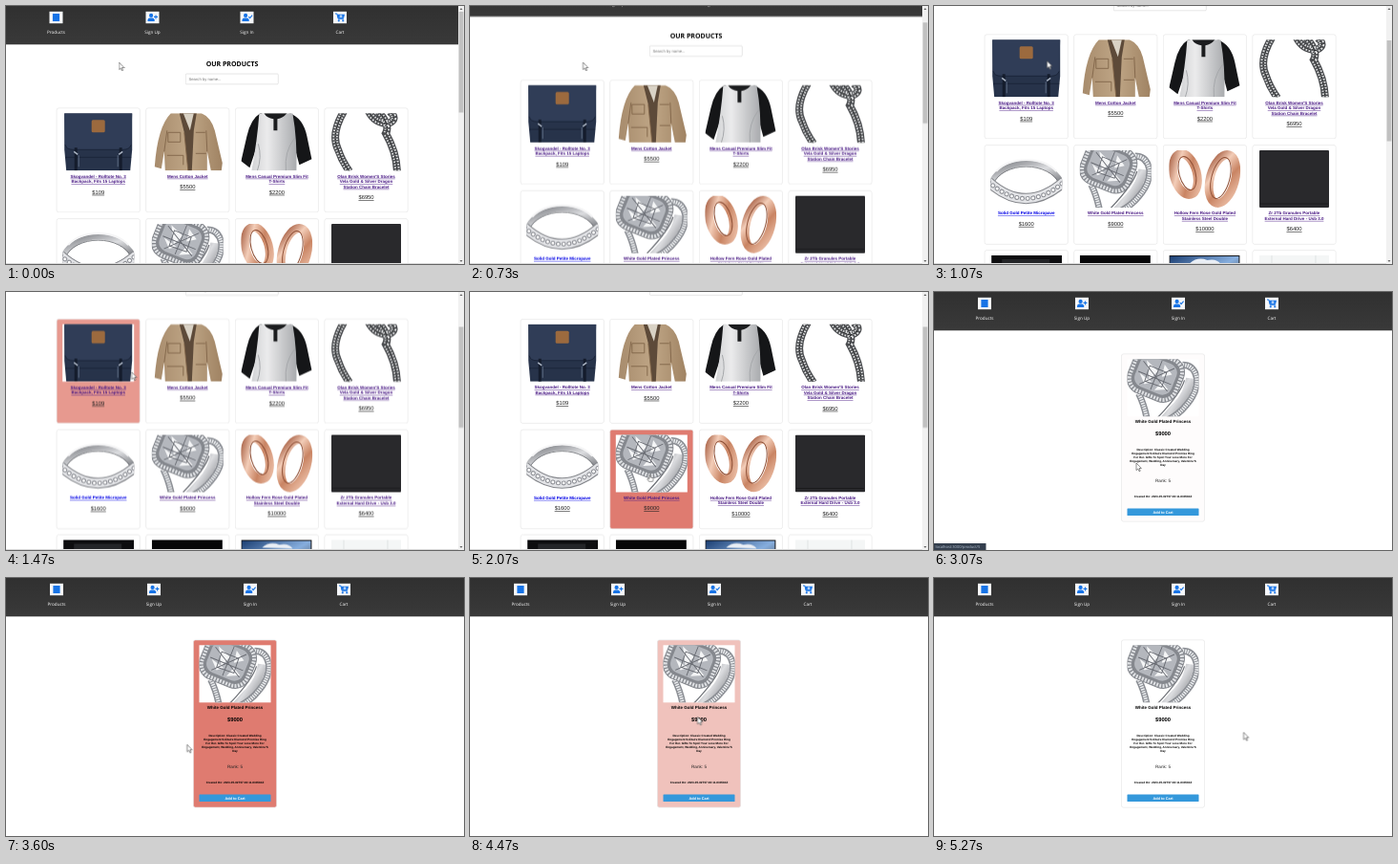
These frames come from a looping animation (480 px wide and 270 px high, 5.74 s). An HTML page:

```html
<!DOCTYPE html>
<html lang="en">
<head>
<meta charset="utf-8">
<title>Product shop</title>
<style>
  html, body { margin: 0; width: 100%; height: 100%; overflow: hidden; background: #fff; }
  svg { display: block; text-rendering: geometricPrecision; }
  text { font-family: "Liberation Sans", Arial, sans-serif; text-anchor: middle; }
  .ui { font-family: "Open Sans", "Noto Sans", sans-serif; }
  .start { text-anchor: start; }
  .name { font-size: 4.5px; font-weight: bold; }
  .price { font-size: 5.8px; }
  .link { text-decoration: underline; text-decoration-thickness: .4px; fill: #4a1a85; }
  .link.new { fill: #0000e6; }
  .link.price { fill: #222; }
  .fine { font-size: 3.05px; font-weight: bold; }
  .card { fill: #fff; stroke: #ebebeb; stroke-width: .5; filter: drop-shadow(0 .4px .6px #0002); }

  .scroll, .thumb, .shop, .item, .detail, .status, .cursor, .arrow, .hand, .hot {
    animation: 5740ms linear infinite;
  }
  .scroll { animation-name: scroll; }
  .thumb { animation-name: thumb; }
  .shop { animation-name: shop; }
  .item { animation-name: item; }
  .detail { animation-name: detail; }
  .status { animation-name: status; }
  .cursor { animation-name: move; }
  .arrow { animation-name: arrow; }
  .hand { animation-name: hand; }
  .hot0 { animation-name: hot0; }
  .hot1 { animation-name: hot1; }
  .hot5 { animation-name: hot5; }
  .hotItem { animation-name: hotItem; }

  @keyframes scroll {
    0%, 12.69% { transform: translateY(0); }
    12.7% { transform: translateY(-28.5px); animation-timing-function: cubic-bezier(.2, .6, .5, 1); }
    18.6% { transform: translateY(-77px); }
    22.1%, 100% { transform: translateY(-78.5px); }
  }
  @keyframes thumb {
    0%, 12.69% { transform: translateY(0); }
    12.7% { transform: translateY(11px); animation-timing-function: cubic-bezier(.2, .6, .5, 1); }
    18.6% { transform: translateY(30px); }
    22.1%, 100% { transform: translateY(30.5px); }
  }
  @keyframes shop { 0%, 49.97% { visibility: visible; } 49.98%, 100% { visibility: hidden; } }
  @keyframes item { 0%, 49.97% { visibility: hidden; } 49.98%, 100% { visibility: visible; } }
  @keyframes detail { 0%, 51% { opacity: 0; } 51.02%, 100% { opacity: 1; } }
  @keyframes status {
    0%, 45.2% { opacity: 0; }
    47.5%, 53.4% { opacity: 1; }
    54.5%, 100% { opacity: 0; }
  }
  @keyframes move {
    0%, 12.7% { transform: translate(118.5px, 59px); }
    18.6%, 23.1% { transform: translate(118.5px, 57.5px); animation-timing-function: ease-in-out; }
    31.36%, 34.8% { transform: translate(186px, 192px); }
    36% { transform: translate(188px, 191px); animation-timing-function: ease-out; }
    44.1%, 53.4% { transform: translate(212px, 179px); animation-timing-function: ease-in-out; }
    62.6% { transform: translate(192.5px, 175px); animation-timing-function: ease-out; }
    67.4%, 73.1% { transform: translate(134.5px, 160px); animation-timing-function: ease-in-out; }
    82.4% { transform: translate(332px, 132px); }
    84.8% { transform: translate(338px, 119.5px); animation-timing-function: ease-in-out; }
    91.8%, 100% { transform: translate(324.5px, 161.5px); }
  }
  @keyframes arrow {
    0%, 31.3% { visibility: visible; }
    31.31%, 49.97% { visibility: hidden; }
    49.98%, 100% { visibility: visible; }
  }
  @keyframes hand {
    0%, 31.3% { visibility: hidden; }
    31.31%, 49.97% { visibility: visible; }
    49.98%, 100% { visibility: hidden; }
  }
  @keyframes hot0 { 0%, 23.1% { fill: #fff; } 25.8% { fill: #e59287; } 29.3%, 100% { fill: #fff; } }
  @keyframes hot1 { 0%, 26.3% { fill: #fff; } 27.9% { fill: #efbab3; } 31.3%, 100% { fill: #fff; } }
  @keyframes hot5 { 0%, 28.2% { fill: #fff; } 31.7%, 100% { fill: #df7b70; } }
  @keyframes hotItem {
    0%, 53.4% { fill: #fff; }
    58%, 62.8% { fill: #df7b70; }
    67.2%, 76% { fill: #fff; }
    79.6% { fill: #e38a80; }
    82.4%, 100% { fill: #fff; }
  }
</style>
</head>
<body>
<svg id="stage" width="480" height="270" viewBox="0 0 480 270">
  <defs>
    <linearGradient id="bar" x2="0" y2="1">
      <stop stop-color="#303030"/><stop offset="1" stop-color="#393939"/>
    </linearGradient>
    <linearGradient id="cloth" x2="1">
      <stop stop-color="#a78b6c"/><stop offset=".5" stop-color="#bfa686"/><stop offset="1" stop-color="#a08363"/>
    </linearGradient>
    <linearGradient id="cotton" x2="1">
      <stop stop-color="#d2d3d5"/><stop offset=".35" stop-color="#ebebec"/><stop offset="1" stop-color="#a9abae"/>
    </linearGradient>
    <linearGradient id="rose" x2="1" y2="1">
      <stop stop-color="#a65e42"/><stop offset=".3" stop-color="#f3cdb8"/>
      <stop offset=".6" stop-color="#c98463"/><stop offset="1" stop-color="#edc0a8"/>
    </linearGradient>
    <linearGradient id="steel" x2="1" y2="1">
      <stop stop-color="#77797e"/><stop offset=".5" stop-color="#dcdde0"/><stop offset="1" stop-color="#6d6f74"/>
    </linearGradient>
    <linearGradient id="sky" x2="1" y2="1">
      <stop stop-color="#1c3f73"/><stop offset=".5" stop-color="#86aede"/><stop offset="1" stop-color="#32271f"/>
    </linearGradient>

    <symbol id="bag" viewBox="0 0 75 60">
      <path fill="#27334a" d="M2 0H73V38L71 60H4L2 38Z"/>
      <path fill="#303d57" d="M2 0H73L72 33Q70 38 64 38H11Q4 38 3 33Z"/>
      <path fill="none" stroke="#1b2539" d="M3 33Q4 38 11 38H64Q70 38 72 33M3 46H72"/>
      <path stroke="#141c2c" stroke-width="3" d="M14 36V60M61 36V60"/>
      <path stroke="#a9b3c2" stroke-width="1.6" d="M12 40L16 43M59 43L63 40"/>
      <path stroke="#6d7b92" stroke-width=".8" d="M17 44V56M58 44V56"/>
      <rect x="30.5" y="7" width="14" height="13" rx="1.5" fill="#9c6a3e"/>
    </symbol>
    <symbol id="coat" viewBox="0 0 75 60">
      <path fill="url(#cloth)" d="M20 0H52Q62 4 66 18L74 52L73 60H62L58 40V60H14L13 40L10 58L3 56Q6 14 20 0Z"/>
      <path fill="#5d4a39" d="M29 0H47L44 18L42 60H38L34 20Z"/>
      <path fill="#d9d2c5" d="M33 0H44L40 18Z"/>
      <path fill="none" stroke="#806549" stroke-width=".9" d="M34 20L38 60M13 40L16 18M58 40L57 18M17 20H30V30H17ZM46 20H56M16 44H33V54M46 42H57"/>
    </symbol>
    <symbol id="tee" viewBox="0 0 75 60">
      <path fill="#151618" d="M20 0Q10 6 6 24L0 50L9 57L18 30L22 0ZM51 0Q65 5 69 24L74 48L61 54L54 28Z"/>
      <path fill="url(#cotton)" d="M19 0H54Q59 28 58 60H11Q17 28 19 0Z"/>
      <path fill="none" stroke="#a5a7aa" d="M56 26Q45 40 47 60M18 32Q22 46 17 60"/>
      <path fill="#1c1d1f" d="M24 0H48Q44 5 38 6V18H34V6Q27 5 24 0Z"/>
    </symbol>
    <path id="links" d="M14 -2Q0 22 8 38Q12 50 20 61M40 -2Q46 10 60 11Q72 6 62 -2M50 -2Q63 12 58 21Q69 40 70 61"/>
    <symbol id="chain" viewBox="0 0 75 60">
      <g fill="none">
        <use href="#links" stroke="#4a4c4f" stroke-width="8"/>
        <use href="#links" stroke="#dfe0e1" stroke-width="5.5" stroke-dasharray="1.5 1.5"/>
        <use href="#links" stroke="#2b2d2f" stroke-width="1.6" stroke-dasharray="1.8 1.2"/>
      </g>
    </symbol>
    <symbol id="band" viewBox="0 0 75 60">
      <g fill="none">
        <path stroke="url(#steel)" stroke-width="6" d="M0 36A39 31 0 0 1 75 36"/>
        <path stroke="#f5f5f6" stroke-width="2" d="M6 22A38 27 0 0 1 69 22"/>
        <path stroke="#696b70" stroke-width=".8" d="M3 35A36 25 0 0 1 72 35"/>
        <path stroke="#85878c" stroke-width="11" d="M-2 33Q37 68 77 33"/>
        <path stroke="#e3e4e7" stroke-width="9" d="M-2 33Q37 68 77 33"/>
        <g stroke-linecap="round" stroke-dasharray=".1 5.6">
          <path stroke="#8f9197" stroke-width="5" d="M-2 33Q37 68 77 33"/>
          <path stroke="#fff" stroke-width="2.8" d="M-2 33Q37 68 77 33"/>
        </g>
      </g>
    </symbol>
    <path id="loops" d="M21 64Q18 48 12 36M58 6Q70 6 73 20Q74 34 62 48Q54 58 42 64"/>
    <symbol id="gem" viewBox="0 0 75 60">
      <g fill="none">
        <path stroke="url(#steel)" stroke-width="9" d="M66 20Q64 36 52 49L38 64"/>
        <path stroke="#6c6f75" stroke-width="1.2" d="M60 22Q56 36 31 62"/>
        <use href="#loops" stroke="#8c8f95" stroke-width="7"/>
        <use href="#loops" stroke="#eceef0" stroke-width="4" stroke-dasharray="1.5 1"/>
      </g>
      <g transform="translate(30 18) rotate(22)">
        <rect x="-29" y="-26" width="57" height="50" rx="17" fill="#85888e"/>
        <rect x="-26" y="-23" width="51" height="44" rx="14" fill="none" stroke="#dfe1e4" stroke-width="4" stroke-dasharray="2 1.3"/>
        <rect x="-21" y="-18" width="41" height="34" rx="10" fill="#b4b7bd"/>
        <path fill="#f4f5f6" d="M-15 -12L0 -6L-5 6ZM4 -15L15 -8L6 -2ZM8 3L17 8L4 14ZM-17 3L-8 12L-2 7Z"/>
        <path fill="none" stroke="#686b72" stroke-width=".9" d="M-18 -10L17 10M-13 14L15 -15M0 -18V15M-19 2H18M-10 -8L9 -8L10 8L-9 9Z"/>
      </g>
    </symbol>
    <symbol id="hoops" viewBox="0 0 75 60">
      <g fill="none" stroke="url(#rose)" stroke-width="9">
        <ellipse cx="17" cy="25" rx="12" ry="22" transform="rotate(-15 17 25)"/>
        <ellipse cx="56" cy="30" rx="13" ry="26" transform="rotate(15 56 30)"/>
      </g>
      <g fill="none" stroke="#8f4f35">
        <ellipse cx="19" cy="24" rx="8.5" ry="18" transform="rotate(-15 19 24)"/>
        <ellipse cx="54" cy="29" rx="9.5" ry="22" transform="rotate(15 54 29)"/>
      </g>
    </symbol>
    <symbol id="drive" viewBox="0 0 75 60">
      <rect x="1" width="73" height="60" rx="1" fill="#29292c"/>
      <path stroke="#1a1a1c" d="M2 56H73"/>
    </symbol>
    <symbol id="slab" viewBox="0 0 75 60">
      <rect x="1" width="74" height="60" fill="#0d0d0f"/>
      <rect x="12" y="4" width="50" height="56" fill="#232427"/>
    </symbol>
    <symbol id="block" viewBox="0 0 75 60">
      <rect width="74" height="60" fill="#060607"/>
    </symbol>
    <symbol id="screen" viewBox="0 0 75 60">
      <rect width="74" height="60" fill="#16181c"/>
      <rect x="1" y="1" width="72" height="40" fill="url(#sky)"/>
      <path fill="#e9eef5" d="M22 8Q30 1 40 5Q50 3 54 9Z"/>
    </symbol>
    <symbol id="pale" viewBox="0 0 75 60">
      <rect x="1" width="73" height="60" fill="#f4f6f6"/>
      <path stroke="#dfe3e3" d="M14 0V60M60 0V60"/>
    </symbol>

    <g id="user">
      <circle cx="-1.4" cy="-2.1" r="2.1"/>
      <path d="M-5 4V2.6Q-4.8 .6 -2.6 .6H-.2Q2 .6 2.2 2.6V4Z"/>
    </g>
  </defs>
</svg>
<script>
  const stage = document.getElementById("stage");

  const label = (x, y, text, cls, extra = "") =>
    `<text x="${x}" y="${y}" class="${cls}" ${extra}>${text}</text>`;

  const stack = (x, y, lines, step, cls) =>
    lines.map((line, i) => label(x, y + i * step, line, cls)).join("");

  const icons = [
    `<rect x="-3.6" y="-4" width="7.2" height="8"/>`,
    `<use href="#user"/><path d="M3.5 -2.6V1.4M1.5 -.6H5.5" stroke="#1673e6" stroke-width="1.1"/>`,
    `<use href="#user"/><path d="M1.8 -.8L3.1 .6L5.6 -2.3" fill="none" stroke="#1673e6" stroke-width="1.1"/>`,
    `<path d="M-5 -4H-3.2L-1.8 1.4H3.8" fill="none" stroke="#1673e6"/><path d="M-3 -3.2H5L4 .7H-2Z"/>
     <circle cx="-1.2" cy="3.3" r="1.1"/><circle cx="3.2" cy="3.3" r="1.1"/>
     <path d="M1 -2.8V.2M-.5 -1.3H2.5" stroke="#fff" stroke-width=".8"/>`
  ];
  const navNames = ["Products", "Sign Up", "Sign In", "Cart"];

  const header = (width, xs) =>
    `<rect width="${width}" height="40.3" fill="url(#bar)"/>` + xs.map((x, i) =>
      `<g transform="translate(${x} 12)" fill="#1673e6">
         <rect x="-7" y="-6.2" width="14" height="12.4" fill="#f5f7fa"/>${icons[i]}</g>` +
      label(x, 28.6, navNames[i], "ui", 'font-size="4.6" fill="#fff"')).join("");

  const products = [
    ["bag", "$109", "Skogvandel - Rolltote No. 3", "Backpack, Fits 15 Laptops"],
    ["coat", "$5500", "Mens Cotton Jacket"],
    ["tee", "$2200", "Mens Casual Premium Slim Fit", "T-Shirts"],
    ["chain", "$6950", "Olan Brisk Women'S Stories", "Vela Gold &amp; Silver Dragon", "Station Chain Bracelet"],
    ["band", "$1600", "Solid Gold Petite Micropave"],
    ["gem", "$9000", "White Gold Plated Princess"],
    ["hoops", "$10000", "Hollow Fern Rose Gold Plated", "Stainless Steel Double"],
    ["drive", "$6400", "Zr 2Tb Granules Portable", "External Hard Drive - Usb 3.0"],
    ["slab", ""], ["block", ""], ["screen", ""], ["pale", ""]
  ];
  const rows = [[107, 108.7], [222.7, 103.5], [332.7, 104]];

  const frame = (x, y, h, art, hot) =>
    `<rect class="card ${hot}" x="${x}" y="${y}" width="87" height="${h}" rx="2"/>
     <rect x="${x + 6}" y="${y + 5.3}" width="75" height="60" fill="#fff"/>
     <use href="#${art}" x="${x + 6}" y="${y + 5.3}" width="75" height="60"/>`;

  const productCard = ([art, price, ...lines], i) => {
    const x = 53.2 + (i % 4) * 93.6;
    const [y, h] = rows[i >> 2];
    const mid = x + 43.5;
    const hot = [0, 1, 5].includes(i) ? `hot hot${i}` : "";
    return frame(x, y, h, art, hot) +
      stack(mid, y + 72.7, lines, 5.5, "name link" + (i === 4 ? " new" : "")) +
      label(mid, y + 78.7 + 5.5 * lines.length, price, "price link");
  };

  const shop = `<g class="shop">
    <g class="scroll">
      ${header(474, [52.5, 153.5, 252.5, 350])}
      ${label(237, 62.8, "OUR PRODUCTS", "ui", 'font-size="7" font-weight="700"')}
      <rect x="188.3" y="71" width="97" height="10.8" rx="1" fill="#fff" stroke="#d6d6d6" stroke-width=".6"/>
      ${label(191.5, 77.8, "Search by name...", "start", 'font-size="4.2" fill="#777"')}
      ${products.map(productCard).join("")}
    </g>
    <path d="M0 269.5H480" stroke="#dcdcdc"/>
    <rect x="474" width="6" height="270" fill="#f1f1f1"/>
    <rect class="thumb" x="474.6" y="6" width="4.8" height="105.5" fill="#c1c1c1"/>
    <path d="M475.5 4L477 2L478.5 4ZM475.5 266L477 268L478.5 266Z" fill="#666"/>
  </g>`;

  const about = [
    "Description: Classic Created Wedding",
    "Engagement Solitaire Diamond Promise Ring",
    "For Her. Gifts To Spoil Your Love More For",
    "Engagement, Wedding, Anniversary, Valentine'S",
    "Day"
  ];

  const item = `<g class="item">
    <rect width="480" height="270" fill="#fff"/>
    ${header(480, [53, 155, 256, 354])}
    <g class="detail">
      ${frame(196.5, 65, 175, "gem", "hot hotItem")}
      ${label(240, 137.1, "White Gold Plated Princess", "name")}
      ${label(240, 149.8, "$9000", "price", 'font-weight="bold"')}
      ${stack(240, 166.4, about, 3.8, "fine")}
      ${label(240, 198.8, "Rank: 5", "", 'font-size="4.65" fill="#222"')}
      ${label(240, 215.1, "Created On: 2023-05-02T07:40:11.833584Z", "fine")}
      <rect x="202.5" y="226.4" width="75" height="7.6" rx=".6" fill="#3498db"/>
      ${label(240, 231.6, "Add to Cart", "", 'font-size="3.9" font-weight="bold" fill="#fff"')}
    </g>
  </g>`;

  const overlay = `<g class="status">
      <rect y="263" width="54.5" height="7" fill="#202c3c"/>
      ${label(1.5, 268, "localhost:3000/product/5", "ui start", 'font-size="4" fill="#a9b8cc"')}
    </g>
    <g class="cursor" fill="#fff" stroke="#444" stroke-width=".6" stroke-linejoin="round">
      <path class="arrow" d="M0 0V7.6L1.8 6L3 8.7L4.2 8.2L3 5.5H5.3Z"/>
      <path class="hand" d="M-.7 .5Q0 -.4 .7 .5V3L3.4 3.7Q4 4 3.8 5L3 7.6H-.8L-2.6 4.8Q-2.4 3.8 -.7 5Z"/>
    </g>`;

  stage.insertAdjacentHTML("beforeend", shop + item + overlay);
</script>
</body>
</html>
```
